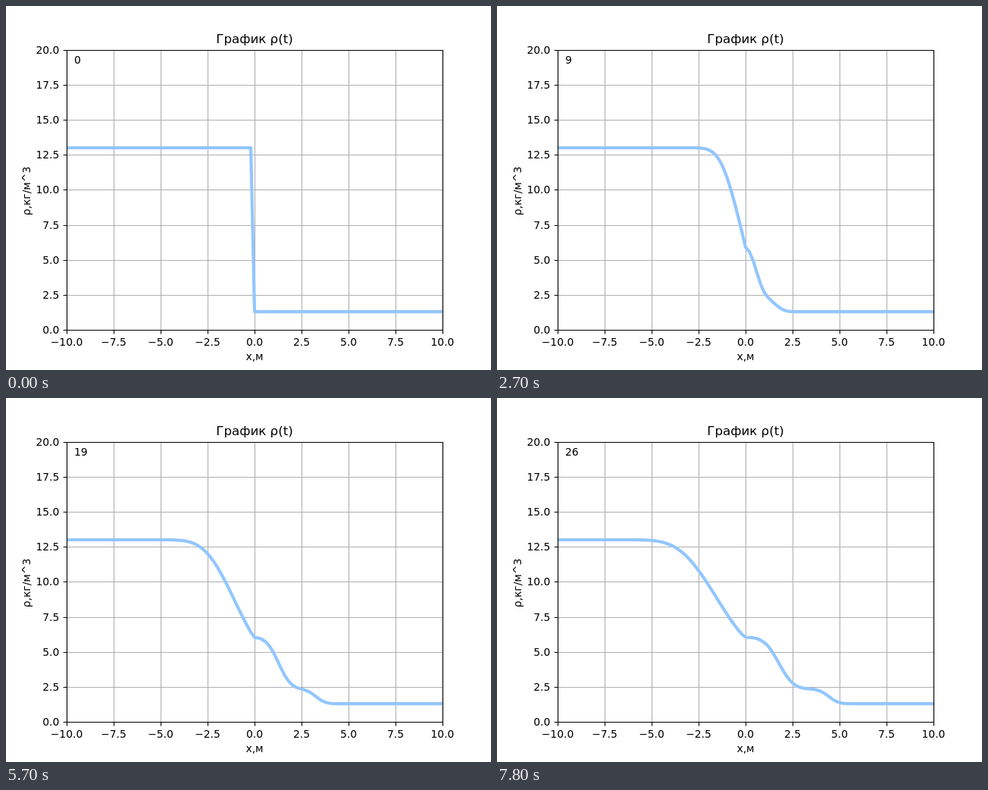
Recreate the animation shown at these times as an HTML page. Size 640 by 480 pixels, loop 8 s.

```html
<!DOCTYPE html>
<html lang="ru">
<head>
<meta charset="utf-8">
<title>График ρ(t)</title>
<style>
  html, body { margin: 0; width: 100%; height: 100%; overflow: hidden; background: #fff; }
  svg { display: block; width: 640px; height: 480px; }
  text { font: 13.89px "DejaVu Sans", Verdana, sans-serif; fill: #000; }
  .title { font-size: 16.67px; }
  .mid { text-anchor: middle; }
  .end { text-anchor: end; }
  path { fill: none; stroke-width: 1.11; }
  #grid { stroke: #b0b0b0; }
  #axes { stroke: #000; }
  #curve { stroke: #92c6ff; stroke-width: 4.17; stroke-linejoin: round; }
</style>
</head>
<body>
<svg viewBox="0 0 640 480">
  <clipPath id="box"><rect x="80" y="57.6" width="496" height="369.6"/></clipPath>
  <path id="grid"/>
  <path id="curve" clip-path="url(#box)"/>
  <path id="axes"/>
  <g id="labels"></g>
  <text class="title mid" x="328" y="49">График ρ(t)</text>
  <text class="mid" x="328" y="467">x,м</text>
  <text class="mid" transform="translate(32 244) rotate(-90)">ρ,кг/м^3</text>
  <text id="count" x="90" y="76">0</text>
</svg>
<script>
const LOOP = 8000, STEP = 300;
const $ = id => document.getElementById(id);
const px = x => 328 + 24.8 * x;
const py = r => 427.2 - 18.48 * r;
const snap = v => Math.floor(v + 0.5) + 0.5;

function label(str, x, y, cls) {
  const el = document.createElementNS("http://www.w3.org/2000/svg", "text");
  el.setAttribute("x", x);
  el.setAttribute("y", y);
  el.setAttribute("class", cls);
  el.textContent = str.replace("-", "\u2212");
  $("labels").append(el);
}

function drawAxes() {
  let grid = "", axes = "M80.5 58.5H576.5V427.5H80.5Z";
  for (let i = 0; i <= 8; i++) {
    const xv = -10 + 2.5 * i, yv = 2.5 * i;
    const x = snap(px(xv)), y = snap(py(yv));
    grid += `M${x} 58V427M80 ${y}H576`;
    axes += `M${x} 427.5v4.9M80.5 ${y}h-4.9`;
    label(xv.toFixed(1), px(xv), 448, "mid");
    label(yv.toFixed(1), 70.3, Math.round(py(yv) + 5.1), "end");
  }
  $("grid").setAttribute("d", grid);
  $("axes").setAttribute("d", axes);
}

// Falling step: 1 on the left, 0 on the right
function fall(x, centre, sigma) {
  const z = (x - centre) / sigma;
  return 0.5 * (1 - Math.tanh(0.798 * (z + 0.0447 * z ** 3)));
}

// Expansion fan left of the diaphragm, 0 at x = 0 and 1 far away
function fan(x, n) {
  if (x >= 0) return 0;
  const power = Math.max(0.6, 0.47 + 0.15 * Math.log(n));
  const s = 1.93 * (-x / (0.065 + 0.072 * n)) ** power;
  return 1 - Math.exp(-(s ** 1.35) * (0.25 + 0.015 * s * s));
}

// Shock tube density: shock, contact and expansion fan after n steps
function density(x, n) {
  if (n === 0) return x < -0.1 ? 13 : 1.3;
  const shock = fall(x, 0.09 + 0.1665 * n, 0.44 * Math.sqrt(n / (n + 4)));
  const contact = fall(x, -0.05 + 0.07 * n, 0.125 * n / Math.sqrt(n + 2.5));
  return 1.3 + 1.05 * shock + 3.7 * contact + 6.95 * fan(x, n);
}

let shown = -1;
function draw(n) {
  const pts = [];
  for (let i = -50; i <= 50; i++) {
    const x = i / 5;
    pts.push(px(x).toFixed(2) + " " + py(density(x, n)).toFixed(2));
  }
  $("curve").setAttribute("d", "M" + pts.join("L"));
  $("count").textContent = n;
  shown = n;
}

function tick() {
  const n = Math.floor((performance.now() % LOOP) / STEP);
  if (n !== shown) draw(n);
  requestAnimationFrame(tick);
}

drawAxes();
tick();
</script>
</body>
</html>
```
